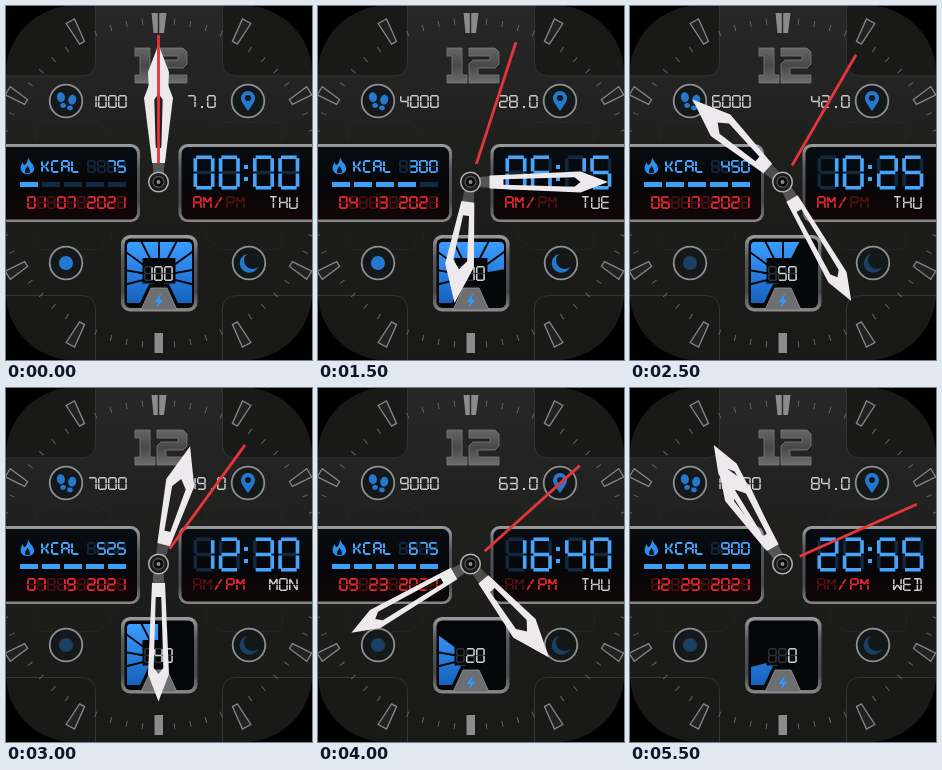
These frames come from a looping animation (306x354 px, 6 s). An HTML page:

```html
<!DOCTYPE html>
<html lang="en">
<head>
<meta charset="utf-8">
<title>Watch face</title>
<style>
html, body { margin: 0; width: 100%; height: 100%; overflow: hidden; background: #000; }
svg { display: block; width: 306px; height: 354px; }
.seg path { fill: none; }
.line { fill: none; stroke: #323331; }
.ring { fill: #151818; stroke: #8d8f91; stroke-width: 1.8; }
</style>
</head>
<body>
<svg viewBox="0 0 306 354">
  <defs>
    <linearGradient id="metal" x2="0" y2="1">
      <stop stop-color="#9a9c9e"/><stop offset=".3" stop-color="#55585b"/>
      <stop offset=".75" stop-color="#45474a"/><stop offset="1" stop-color="#8a8a8a"/>
    </linearGradient>
    <linearGradient id="screen" x2="0" y2="1">
      <stop stop-color="#080d12"/><stop offset=".5" stop-color="#050608"/><stop offset="1" stop-color="#100607"/>
    </linearGradient>
    <linearGradient id="band" x2="0" y2="1">
      <stop stop-color="#272727"/><stop offset=".5" stop-color="#1d1e1c"/><stop offset="1" stop-color="#191a18"/>
    </linearGradient>
    <linearGradient id="digit" x2="0" y2="1">
      <stop stop-color="#666"/><stop offset=".5" stop-color="#484848"/><stop offset="1" stop-color="#6d6d6d"/>
    </linearGradient>
    <linearGradient id="blue" gradientUnits="userSpaceOnUse" x1="0" y1="236" x2="0" y2="298">
      <stop stop-color="#3a9cff"/><stop offset="1" stop-color="#1560bd"/>
    </linearGradient>
    <clipPath id="face"><rect width="306" height="354" rx="68"/></clipPath>
    <clipPath id="gauge"><path d="M124 236H182Q186 236 186 240V297H172L163 278H143L134 297H121V240Q121 236 124 236Z"/></clipPath>
  </defs>

  <g clip-path="url(#face)">
    <rect width="306" height="354" fill="url(#band)"/>
    <g id="corners"></g>
    <g id="ticks"></g>
    <path d="M145.500 7H151.800V27H147.500ZM153.200 7H160.500L158 27H153.200Z" fill="#8b8b8b"/>
    <path d="M148.500 327H157V347H148.500Z" fill="#8b8b8b"/>

    <g fill="url(#digit)" stroke="#7c7c7c" stroke-width=".8">
      <path d="M129 42H144V69H149V77H129V69H134V50H129Z"/>
      <path d="M151 42H177L181 46V58L177 62H160V69H181V77H151V58L155 54H172V50H151Z"/>
    </g>

    <rect x="-12" y="138" width="146" height="78" rx="9" fill="url(#metal)"/>
    <rect x="-12" y="141" width="143" height="72.500" rx="6.500" fill="url(#screen)"/>
    <rect x="172.500" y="138" width="146" height="78" rx="9" fill="url(#metal)"/>
    <rect x="175.500" y="141" width="143" height="72.500" rx="6.500" fill="url(#screen)"/>

    <circle class="ring" cx="60" cy="95" r="16.300"/>
    <circle class="ring" cx="242" cy="95" r="16.300"/>
    <circle class="ring" cx="60" cy="257" r="16.300"/>
    <circle class="ring" cx="243" cy="257" r="16.300"/>
    <g fill="#2379d0">
      <g transform="rotate(-12 56 94)">
        <ellipse cx="55.500" cy="91" rx="4" ry="5"/><ellipse cx="56" cy="99.500" rx="2.900" ry="2.400"/>
      </g>
      <g transform="rotate(12 65 97)">
        <ellipse cx="65.500" cy="93.500" rx="4" ry="5"/><ellipse cx="65" cy="102" rx="2.900" ry="2.400"/>
      </g>
      <path fill-rule="evenodd" d="M242 105C238 99 235 96 235 92A7 7 0 0 1 249 92C249 96 246 99 242 105ZM242 89A3 3 0 1 0 242 95A3 3 0 1 0 242 89Z"/>
    </g>
    <g id="night" fill="#2379d0">
      <circle cx="60" cy="257" r="7"/>
      <path d="M241 248A9.500 9.500 0 1 0 252 261A8.500 8.500 0 0 1 241 248Z"/>
    </g>

    <path d="M22 151C23 156 29 158 28 164Q27 168 21.500 168Q15 168 14.500 162Q14.500 159 17 156Q17 159 19 159Q22 156 22 151Z" fill="#2d8fec"/>
    <path d="M21.500 160Q25 164 23.500 167H19.500Q18 164 21.500 160Z" fill="#071626"/>
    <g id="bars"></g>

    <rect x="115" y="229" width="76.500" height="76.500" rx="9" fill="url(#metal)"/>
    <rect x="118.500" y="232.500" width="69.500" height="69.500" rx="6" fill="#060708"/>
    <g id="wedges" clip-path="url(#gauge)" fill="url(#blue)" stroke="#060708" stroke-width="1.800"></g>
    <rect x="136.500" y="252" width="33" height="25.500" fill="#060708"/>
    <path d="M135 304L145 282H161L171 304Z" fill="#6c6e70" stroke="#999" stroke-width=".8"/>
    <path d="M155 287L148.500 296H152.500L150.500 302L157.500 293.500H153.500Z" fill="#3199ff"/>

    <g id="show" class="seg"></g>

    <g transform="translate(152.500 176)">
      <g id="hour">
        <path d="M-5-8L-6-21H6L5-8Z" fill="#4c4c4c"/>
        <path fill="#eee9ec" fill-rule="evenodd" d="M-6.500-20L-14.500-84L0-122L14.500-84L6.500-20ZM-3-34L-7-79L0-88L7-79L3-34Z"/>
      </g>
      <g id="minute">
        <path d="M-5-8L-6-21H6L5-8Z" fill="#555"/>
        <path fill="#eee9ec" fill-rule="evenodd" d="M-6.500-19L-10.500-110L0-137.500L10.500-110L6.500-19ZM-2.800-33L-4.800-104L0-110L4.800-104L2.800-33Z"/>
      </g>
      <path id="second" d="M0-19V-147" stroke="#e5343a" stroke-width="2.800"/>
      <circle r="9.800" fill="#1c1c1c" stroke="#b0b0b0" stroke-width="1.500"/>
      <circle r="5.500" fill="#0b0b0b" stroke="#555" stroke-width="1.300"/>
      <circle r="2" fill="#8c8c8c"/>
    </g>
  </g>
</svg>

<script>
const $ = id => document.getElementById(id);
const BLUE = '#45a5fc', RED = '#e2262c', WHITE = '#c9cbcc';
const DIM_BLUE = '#12283e', DIM_RED = '#4c1013';

// Segment ends in a unit cell; h-k are diagonals, l and m the centre stem.
const SEG = {
  a: [0, 0, 1, 0], b: [1, 0, 1, .5], c: [1, .5, 1, 1], d: [0, 1, 1, 1],
  e: [0, .5, 0, 1], f: [0, 0, 0, .5], g: [0, .5, 1, .5],
  h: [0, 0, .5, .5], i: [1, 0, .5, .5], j: [.5, .5, 1, 1], k: [.5, .5, 0, 1],
  l: [.5, 0, .5, .5], m: [.5, .5, .5, 1], n: [0, .5, .5, .5]
};
const GLYPH = {
  0: 'abcdef', 1: 'bc', 2: 'abged', 3: 'abgcd', 4: 'fgbc', 5: 'afgcd', 6: 'afgedc',
  7: 'abc', 8: 'abcdefg', 9: 'abcdfg', '/': 'ik',
  A: 'abcefg', C: 'adef', D: 'abcdlm', E: 'adefg', F: 'aefg', H: 'bcefg', I: 'adlm',
  K: 'efnij', L: 'def', M: 'bcefhi', N: 'bcefhj', O: 'abcdef', P: 'abefg',
  R: 'abefgj', S: 'afgcd', T: 'alm', U: 'bcdef', W: 'bcefkj', ' ': ''
};

function segPath(text, x, y, w, h, step, thick) {
  const r = thick / 2, gap = thick * .25;
  let d = '';
  [...text].forEach((ch, n) => {
    for (const s of GLYPH[ch]) {
      const [x1, y1, x2, y2] = SEG[s];
      const at = (u, v) => [x + n * step + r + u * (w - thick), y + r + v * (h - thick)];
      const p = at(x1, y1), q = at(x2, y2);
      const len = Math.hypot(q[0] - p[0], q[1] - p[1]);
      const dx = (q[0] - p[0]) / len * gap, dy = (q[1] - p[1]) / len * gap;
      d += `M${p[0] + dx} ${p[1] + dy}L${q[0] - dx} ${q[1] - dy}`;
    }
  });
  return d;
}

function print(text, x, y, color, o = {}) {
  const { w = 8.8, h = 13, step = 10, thick = 1.5, ghost } = o;
  const draw = (s, c) => `<path d="${segPath(s, x, y, w, h, step, thick)}" stroke="${c}" stroke-width="${thick}"/>`;
  return (ghost ? draw('8'.repeat(text.length), ghost) : '') + draw(text, color);
}

const pad = n => String(n).padStart(2, '0');
const turn = (id, deg) => $(id).setAttribute('transform', `rotate(${deg})`);

function buildDial() {
  let s = '';
  for (const [sx, sy] of [[1, 1], [-1, 1], [1, -1], [-1, -1]]) {
    s += `<g transform="translate(153 ${sy > 0 ? 0 : 359.5}) scale(${sx} ${sy}) translate(-153 0)">
      <path d="M-5 -5H89.500V56Q89.500 70 75 70H-5Z" fill="#191a18" stroke="#333"/>
      <path class="line" d="M30 134V122Q30 116 37 116H92L106 128V136" stroke-dasharray="1 2"/></g>`;
  }
  $('corners').innerHTML = s;

  s = '';
  for (let n = 0; n < 60; n++) {
    if (n % 15 === 0) continue;
    const a = n * Math.PI / 30;
    const deg = Math.atan2(Math.sin(a), Math.cos(a) * 1.06) * 180 / Math.PI;
    const r = 153 + 9 * Math.abs(Math.cos(a)) ** 2, end = r + 20 + 6 * Math.abs(Math.cos(a)) ** 2;
    s += `<g transform="translate(152.500 177) rotate(${deg})">` + (n % 5
      ? '<path d="M0-159V-165" stroke="#626262"/>'
      : `<path d="M-2.800 ${-r}L-4.800 ${-end}H4.800L2.800 ${-r}Z" fill="#222" stroke="#858585" stroke-width="1.300"/>`) + '</g>';
  }
  $('ticks').innerHTML = s;

  $('bars').innerHTML = [0, 1, 2, 3, 4]
    .map(n => `<rect x="${14 + n * 22}" y="176" width="18" height="5"/>`).join('');

  const edges = [-150, -104, -80, -54, -27, 0, 27, 54, 80, 104, 150];
  const ray = deg => {
    const a = deg * Math.PI / 180;
    return `${153 + 80 * Math.sin(a)} ${270 - 80 * Math.cos(a)}`;
  };
  $('wedges').innerHTML = edges.slice(1)
    .map((e, n) => `<path d="M153 270L${ray(edges[n])}L${ray(e)}Z"/>`).join('');
}

function show(k) {
  const hour = 2 * k, min = 5 * k, day = 7 + 2 * k;
  const charge = Math.max(0, 100 - 10 * k);
  const pm = hour >= 12;
  const week = ['SUN', 'MON', 'TUE', 'WED', 'THU', 'FRI', 'SAT'][new Date(2021, k, day).getDay()];
  const big = { w: 21, h: 34, step: 25.3, thick: 3.6, ghost: DIM_BLUE };
  const bold = { thick: 1.8 };
  const km = String(7 * (k + 1)), kmEnd = 181 + 10 * km.length;

  $('show').innerHTML =
    print(String(1000 * (k + 1)), 82, 89, WHITE) +
    print(km, 181, 89, WHITE) +
    print('0', kmEnd + 10, 89, WHITE) +
    `<rect x="${kmEnd + 4}" y="100" width="2" height="2" style="fill:${WHITE}"/>` +
    print('KCAL', 35, 154, BLUE, { thick: 2 }) +
    print(String(75 * (k + 1)).padStart(4, ' '), 81, 154, BLUE, { ...bold, ghost: DIM_BLUE }) +
    print(`${pad(k + 1)} ${pad(day)} 2021`, 21, 190, RED, { ...bold, ghost: DIM_RED }) +
    print(pad(hour), 187.5, 149.5, BLUE, big) +
    print(pad(min), 247, 149.5, BLUE, big) +
    `<path d="M238 159h4v4h-4zM238 171h4v4h-4z" style="fill:${BLUE}"/>` +
    print('AM', 187, 190, pm ? DIM_RED : RED, bold) +
    print('/', 208, 190, RED, bold) +
    print('PM', 220, 190, pm ? RED : DIM_RED, bold) +
    print(week, 263, 190, WHITE) +
    print(String(charge).padStart(3, ' '), 138, 260, WHITE, { h: 15, ghost: '#30343a' });

  [...$('bars').children].forEach((b, n) => b.setAttribute('fill', n <= k ? '#3ba0fa' : DIM_BLUE));
  [...$('wedges').children].forEach((w, n) => w.setAttribute('visibility', n <= charge / 10 ? 'visible' : 'hidden'));
  $('night').setAttribute('opacity', k < 5 ? 1 : .42);

  turn('hour', hour * 30 + min / 2);
  turn('minute', min * 6);
  turn('second', k * 6);
}

buildDial();
let last = -1;
const start = performance.now();
function tick() {
  const k = Math.floor((performance.now() - start) / 500) % 12;
  if (k !== last) show(last = k);
  requestAnimationFrame(tick);
}
tick();
</script>
</body>
</html>
```
